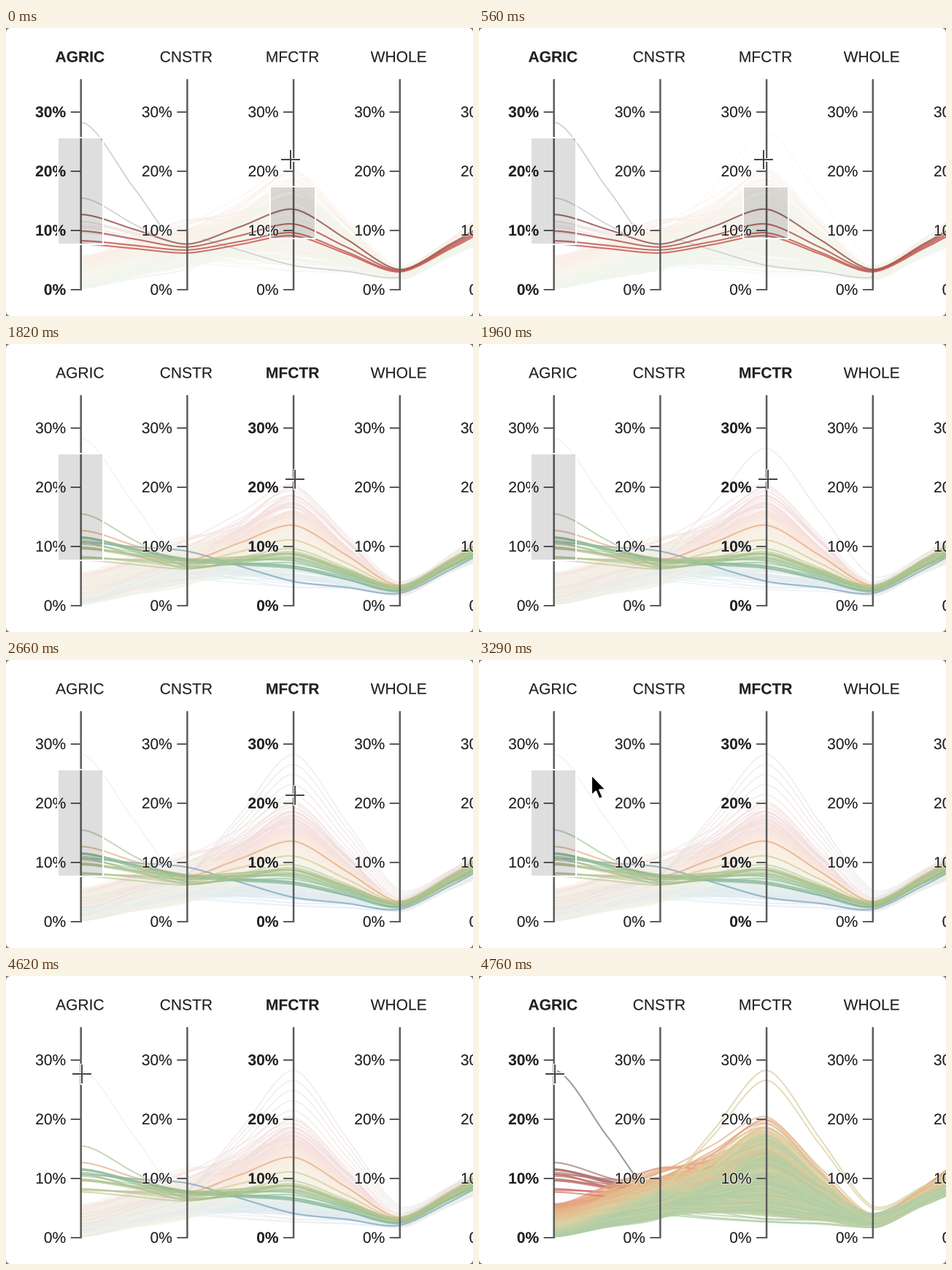
These frames come from a looping animation (640 by 394 pixels, 4830 ms). A matplotlib script:

```python
import numpy as np
import matplotlib.pyplot as plt
from matplotlib.animation import FuncAnimation
from matplotlib.collections import LineCollection
from matplotlib.patches import Circle, Polygon, Rectangle, Wedge
from matplotlib.patheffects import withStroke

W, H, DPI = 640, 394, 100
STEP, FRAMES = 70, 69
PT = 72 / DPI                       # points per pixel
AXES_X = 102.7 + 145.7 * np.arange(6)
TITLES = ["AGRIC", "CNSTR", "MFCTR", "WHOLE", "RETAIL"]
AGRIC, MFCTR = 0, 2
ZONE = 32                           # reach of a brush to either side of its axis

CLEAR_MFCTR, RECOLOUR = 1610, 1820
CLEAR_AGRIC, RESET = 4550, 4760

# Colours from low to high values
PALETTE = np.array([(95, 145, 180), (145, 192, 145), (212, 200, 140),
                    (226, 155, 100), (205, 85, 78), (105, 80, 78)]) / 255
LEVELS = [0, 1, 2, 3, 4, 8]


def y_of(percent):
    return 358 - 8.1 * np.asarray(percent)


def columns(*parts):
    return np.column_stack(np.broadcast_arrays(*parts))


def make_rows():
    rng = np.random.default_rng(7)

    # Bulk of the data: every column rises with the first one
    n = 450
    a = .2 + 6 * rng.beta(1.1, 2.4, n)
    mass = columns(a, 3 + a + rng.uniform(-.4, 3.6, n).clip(0),
                   np.minimum(2.3 + .9 * a + 15 * rng.beta(1.2, 1.6, n), 20.5),
                   1.6 + 2.5 * rng.beta(2, 2, n), 8.5 + .7 * a + rng.uniform(0, 2.5, n), 8)

    # Lines inside the first brush, then those inside both
    n = 14
    strong = columns(rng.uniform(7.8, 13, n), rng.uniform(6, 8, n), rng.uniform(6.2, 8.9, n),
                     rng.uniform(2.4, 3.4, n), rng.uniform(10, 13, n), 8)
    g = np.linspace(1, 0, 4)
    picked = columns(7.7 + 5 * g**2, 6.2 + 1.5 * g, 9.1 + 4.5 * g**2, 3 + .4 * g,
                     11.3 + 1.2 * g, 8)

    g = np.linspace(1, 0, 5)
    peaks = columns(2 + 2 * (1 - g), 8, 21.5 + 6.8 * g, 3.8 + 1.5 * g, 12.5, 8)
    first = [(28.3, 6, 15.7, 3.2, 12, 8), (10.7, 9.2, 4.1, 2.1, 10.5, 8)]
    last = [(15.5, 6.6, 8, 2.8, 11, 8)]

    # High values tend to be drawn early, beneath the rest
    mixed = np.vstack([mass, strong, picked, peaks[:2]])
    mixed = mixed[np.argsort(rng.normal(0, 2, len(mixed)) - mixed[:, AGRIC])]
    return np.vstack([first, mixed, peaks[2:], last])


def make_curves(rows, smooth=.14, samples=10):
    """Bezier chains through the axes and the midpoints between them."""
    n, k = rows.shape
    pts = np.empty((n, 2 * k - 1, 2))
    pts[:, ::2, 0], pts[:, ::2, 1] = AXES_X, y_of(rows)
    pts[:, 1::2] = (pts[:, :-1:2] + pts[:, 2::2]) / 2
    tan = np.zeros_like(pts)
    tan[:, 1:-1] = smooth * (pts[:, 2:] - pts[:, :-2])
    tan[:, [0, -1], 0] = smooth * (AXES_X[1] - AXES_X[0])
    u = np.linspace(0, 1, samples, endpoint=False)[:, None]
    p, q = pts[:, :-1, None], pts[:, 1:, None]
    tp, tq = tan[:, :-1, None], tan[:, 1:, None]
    curve = ((1 - u) ** 3 * p + 3 * u * (1 - u) ** 2 * (p + tp)
             + 3 * u ** 2 * (1 - u) * (q - tq) + u ** 3 * q)
    return curve.reshape(n, -1, 2)


def grade(level):
    return np.column_stack([np.interp(level, LEVELS, channel) for channel in PALETTE.T])


def ease(t, start, end):
    u = np.clip((t - start) / (end - start), 0, 1)
    return u * u * (3 - 2 * u)


def ramp(t, start, end, low):
    return low + (1 - low) * np.clip((t - start) / (end - start), 0, 1)


rows = make_rows()
curves = make_curves(rows)
order = np.arange(len(rows)) / len(rows)
colors = {AGRIC: grade(1 + rows[:, AGRIC] / 2.4), MFCTR: grade((rows[:, MFCTR] - 4) / 3.3)}
in_agric = (rows[:, AGRIC] > 7.6) & (rows[:, AGRIC] < 25.8)
in_both = in_agric & (rows[:, MFCTR] > 9) & (rows[:, MFCTR] < 17.4)

fig = plt.figure(figsize=(W / DPI, H / DPI), dpi=DPI, facecolor="white")
ax = fig.add_axes([0, 0, 1, 1])
ax.set(xlim=(0, W), ylim=(H, 0))
ax.axis("off")

ghosts = ax.add_collection(LineCollection([], linewidths=1.6 * PT, zorder=1))
lines = ax.add_collection(LineCollection([], linewidths=2.1 * PT, zorder=2))


def part(index, left, right):
    curve = curves[index]
    return curve[(curve[:, 0] >= left) & (curve[:, 0] <= right)]


remnants = ax.add_collection(LineCollection(
    [part(0, 0, 212), part(-1, 0, 205), part(1, 265, 540)],
    linewidths=1.6 * PT, colors="#d0d0d0", zorder=1.5))

# Axes, ticks and labels
halo = [withStroke(linewidth=2 * PT, foreground=(1, 1, 1, .6))]
labels = []


def rule(xs, ys, width):
    ax.plot(xs, ys, color="#5c5c5c", lw=width * PT, zorder=3, solid_capstyle="butt",
            snap=False)


for x, title in zip(AXES_X, TITLES):
    style = dict(family="Liberation Sans", fontsize=21 * PT, color="#222222",
                 va="baseline", zorder=4, path_effects=halo)
    group = [ax.text(x - 1.5, 46.5, title, ha="center", **style)]
    rule([x, x], [70, 359], 2.5)
    for percent in range(0, 40, 10):
        y = y_of(percent)
        rule([x - 14, x], [y, y], 2)
        group.append(ax.text(x - 20.5, y + 7, f"{percent}%", ha="right", **style))
    labels.append(group)


def add_brush(axis, top, bottom):
    return ax.add_patch(Rectangle((AXES_X[axis] - ZONE, top), 2 * ZONE - 2, bottom - top,
                                  fc=(0, 0, 0, .13), ec="white", lw=2 * PT, zorder=5))


brush_agric = add_brush(AGRIC, 149.5, 295.5)
brush_mfctr = add_brush(MFCTR, 217, 287.5)

# Pointer shapes
click = ax.add_patch(Circle((0, 0), 48, fc=(1, 1, 1, .35), ec="black", lw=2 * PT, zorder=6))
cross_halo = [withStroke(linewidth=5 * PT, foreground="white")]
cross = [ax.plot([], [], color="#444444", lw=1.8 * PT, zorder=z, path_effects=effects,
                 solid_capstyle="projecting")[0]
         for z, effects in ((7, cross_halo), (7, cross_halo), (7.5, []), (7.5, []))]
ARROW = np.array([(0, 0), (0, 27), (6, 21.5), (10.5, 32), (15, 30), (10.5, 19.5), (19, 19.5)])
arrow = ax.add_patch(Polygon(ARROW, fc="black", ec="white", lw=1.5 * PT, zorder=7))

# Rounded window corners
RADIUS = 6
for k, (cx, cy) in enumerate([(W, H), (0, H), (0, 0), (W, 0)]):
    centre = abs(cx - RADIUS), abs(cy - RADIUS)
    ax.add_patch(Wedge(centre, 2 * RADIUS, 90 * k, 90 * k + 90, width=RADIUS,
                       fc="#777777", lw=0, zorder=8))


def pointer(t):
    settle = ease(t, 630, 1050)
    x, y = 390 + 6 * settle, 180 + 4.5 * settle
    x += (99 - 396) * ease(t, 2870, 3450)
    y += (131 - 184.5) * ease(t, 2940, 3640)
    settle = ease(t, 3920, 4270)
    return x + 5 * settle, y + 3 * settle


def place_pointer(t):
    x, y = pointer(t)
    on_axis = np.abs(AXES_X - x).min() < ZONE
    for k, line in enumerate(cross):
        line.set_visible(on_axis)
        line.set_data(*(([x, x], [y - 12, y + 12]) if k % 2 else ([x - 12, x + 12], [y, y])))
    arrow.set_visible(not on_axis)
    arrow.set_xy(ARROW + (x, y))
    click.set_center((x, y))
    click.set_visible(1400 <= t <= 1540 or 4340 <= t <= 4480)


def show(collection, mask, axis, alpha, tint=1.0):
    rgb = 1 - (1 - colors[axis][mask]) * tint
    collection.set_segments(list(curves[mask]))
    collection.set_color(np.column_stack([rgb, np.full(len(rgb), alpha)]))


def update(i):
    t = i * STEP
    if t < RECOLOUR:
        active, chosen, alpha, tint = AGRIC, in_both, .82, 1
        fraction, ghost_tint = ramp(t, 0, 1260, .5), .15
    elif t < RESET:
        active, chosen, alpha, tint = MFCTR, in_agric, .6, 1
        fraction, ghost_tint = ramp(t, RECOLOUR, 2660, .6), .19
    else:
        active, chosen, alpha, tint = AGRIC, order < .99, .72, .8
        fraction, ghost_tint = 0, 0
    show(ghosts, (order < fraction) & ~chosen, active, .55, ghost_tint)
    show(lines, chosen, active, alpha, tint)
    remnants.set_visible(t < RECOLOUR)
    brush_mfctr.set_visible(t < CLEAR_MFCTR)
    brush_agric.set_visible(t < CLEAR_AGRIC)
    for axis, group in enumerate(labels):
        for text in group:
            text.set_fontweight("bold" if axis == active else "normal")
    place_pointer(t)


anim = FuncAnimation(fig, update, frames=FRAMES, interval=STEP, init_func=lambda: update(0),
                     repeat=True, repeat_delay=0, blit=False)
plt.show()
```
